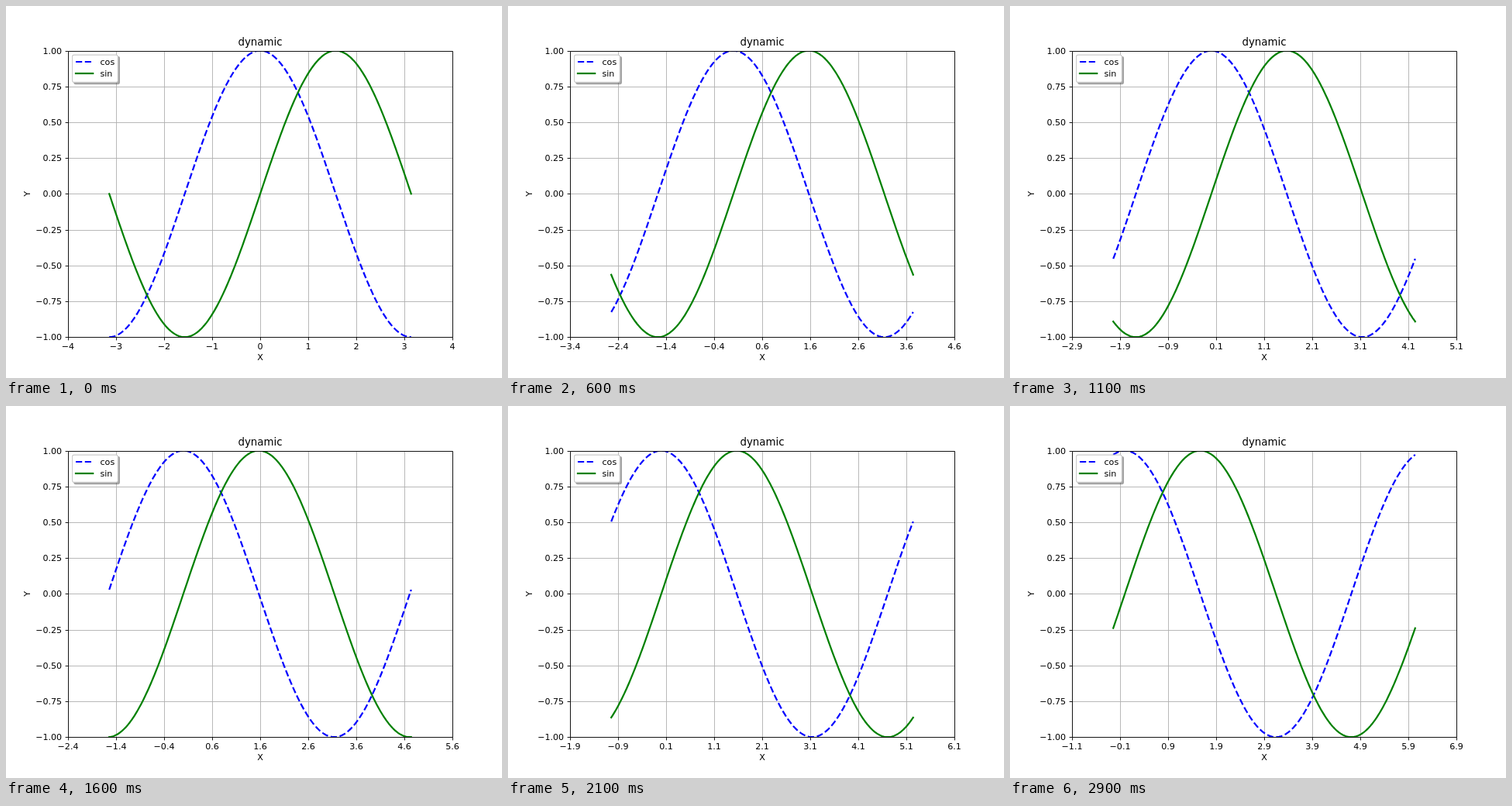
Write an HTML page that moves like this. It is 640 by 480 pixels and loops after 3000 ms.

```html
<!DOCTYPE html>
<html lang="en">
<head>
<meta charset="utf-8">
<title>dynamic</title>
<style>
  html, body { margin: 0; width: 100%; height: 100%; overflow: hidden; background: #fff; }
  svg { display: block; width: 640px; height: 480px; }
  text { font: 11.11px "DejaVu Sans", sans-serif; fill: #000; }
  .title { font-size: 13.33px; }
  .mid { text-anchor: middle; }
  .end { text-anchor: end; }
  .grid { stroke: #b0b0b0; stroke-width: .89; }
  .axis { stroke: #000; stroke-width: .89; fill: none; }
  .cos, .sin { fill: none; stroke-width: 2.22; stroke-linejoin: round; }
  .cos { stroke: #00f; stroke-dasharray: 8.22 3.56; }
  .sin { stroke: #008000; stroke-linecap: square; }
</style>
</head>
<body>
<svg id="plot" viewBox="0 0 640 480">
  <clipPath id="area"><rect x="80" y="58" width="496" height="369"/></clipPath>
</svg>
<script>
(() => {
  const STEP = 100, STEPS = 30;
  const LEFT = 80, RIGHT = 576, TOP = 57.6, BOTTOM = 427.2;
  const UNIT = 62, MID_X = 328, MID_Y = 242.4, AMP = 184.8;
  const TICK = 3.89;

  const plot = document.getElementById('plot');

  function add(tag, attrs, parent = plot) {
    const el = document.createElementNS('http://www.w3.org/2000/svg', tag);
    for (const key in attrs) el.setAttribute(key, attrs[key]);
    return parent.appendChild(el);
  }

  function label(str, x, y, cls = '', extra = {}) {
    const el = add('text', { x, y, class: cls, ...extra });
    el.textContent = str;
    return el;
  }

  const path = (d, cls, parent) => add('path', { d, class: cls }, parent);
  const snap = v => Math.round(v) + 0.5;
  const minus = s => s.replace('-', '\u2212');

  const [x0, x1, y0, y1] = [LEFT, RIGHT, TOP, BOTTOM].map(snap);
  const xs = Array.from({ length: 9 }, (_, k) => LEFT + UNIT * k);
  const ys = Array.from({ length: 9 }, (_, k) => TOP + (BOTTOM - TOP) / 8 * k);

  // Grid, ticks and labels
  for (const x of xs) path(`M${snap(x)} ${y1}V${y0}`, 'grid');
  for (const y of ys) path(`M${x0} ${snap(y)}H${x1}`, 'grid');

  const xLabels = xs.map(x => {
    path(`M${snap(x)} ${y1}v${TICK}`, 'axis');
    return label('', x, 443, 'mid');
  });
  ys.forEach((y, k) => {
    path(`M${x0} ${snap(y)}h${-TICK}`, 'axis');
    label(minus((1 - k / 4).toFixed(2)), 72.2, Math.round(y) + 4, 'end');
  });

  // Curves, then the frame on top
  const curves = add('g', { 'clip-path': 'url(#area)' });
  const waves = [['cos', Math.cos], ['sin', Math.sin]]
    .map(([cls, fn]) => ({ fn, el: path('', cls, curves) }));

  path(`M${x0} ${y0}H${x1}V${y1}H${x0}Z`, 'axis');
  label('dynamic', MID_X, 51, 'title mid');
  label('X', MID_X, 457, 'mid');
  label('Y', 0, 0, 'mid', { transform: `translate(31 ${MID_Y}) rotate(-90)` });

  // Legend
  const box = { x: 85.56, y: 63.16, width: 58.7, height: 35.2, rx: 2.2, 'stroke-width': 1.11 };
  add('rect', { ...box, fill: '#4c4c4c', stroke: '#4c4c4c', opacity: .5, transform: 'translate(2.22 2.22)' });
  add('rect', { ...box, fill: '#fff', stroke: '#ccc' });
  ['cos', 'sin'].forEach((name, i) => {
    path(`M90 ${72 + 15 * i}h22.2`, name);
    label(name, 121.5, 76 + 15 * i);
  });

  function wave(fn, shift) {
    const pts = [];
    for (let i = 0; i < 256; i++) {
      const u = Math.PI * (2 * i / 255 - 1);
      pts.push(`${(MID_X + UNIT * u).toFixed(2)} ${(MID_Y - AMP * fn(u + shift)).toFixed(2)}`);
    }
    return 'M' + pts.join('L');
  }

  let shown = -1;
  function draw(time) {
    const n = Math.floor(time / STEP) % STEPS;
    if (n === shown) return;
    shown = n;
    for (const { fn, el } of waves) el.setAttribute('d', wave(fn, n / 10));
    xLabels.forEach((el, k) => {
      const value = (n + 10 * (k - 4)) / 10;
      el.textContent = minus(value.toFixed(n % 10 ? 1 : 0));
    });
  }

  const start = performance.now();
  function tick() {
    draw(performance.now() - start);
    requestAnimationFrame(tick);
  }
  tick();
})();
</script>
</body>
</html>
```
